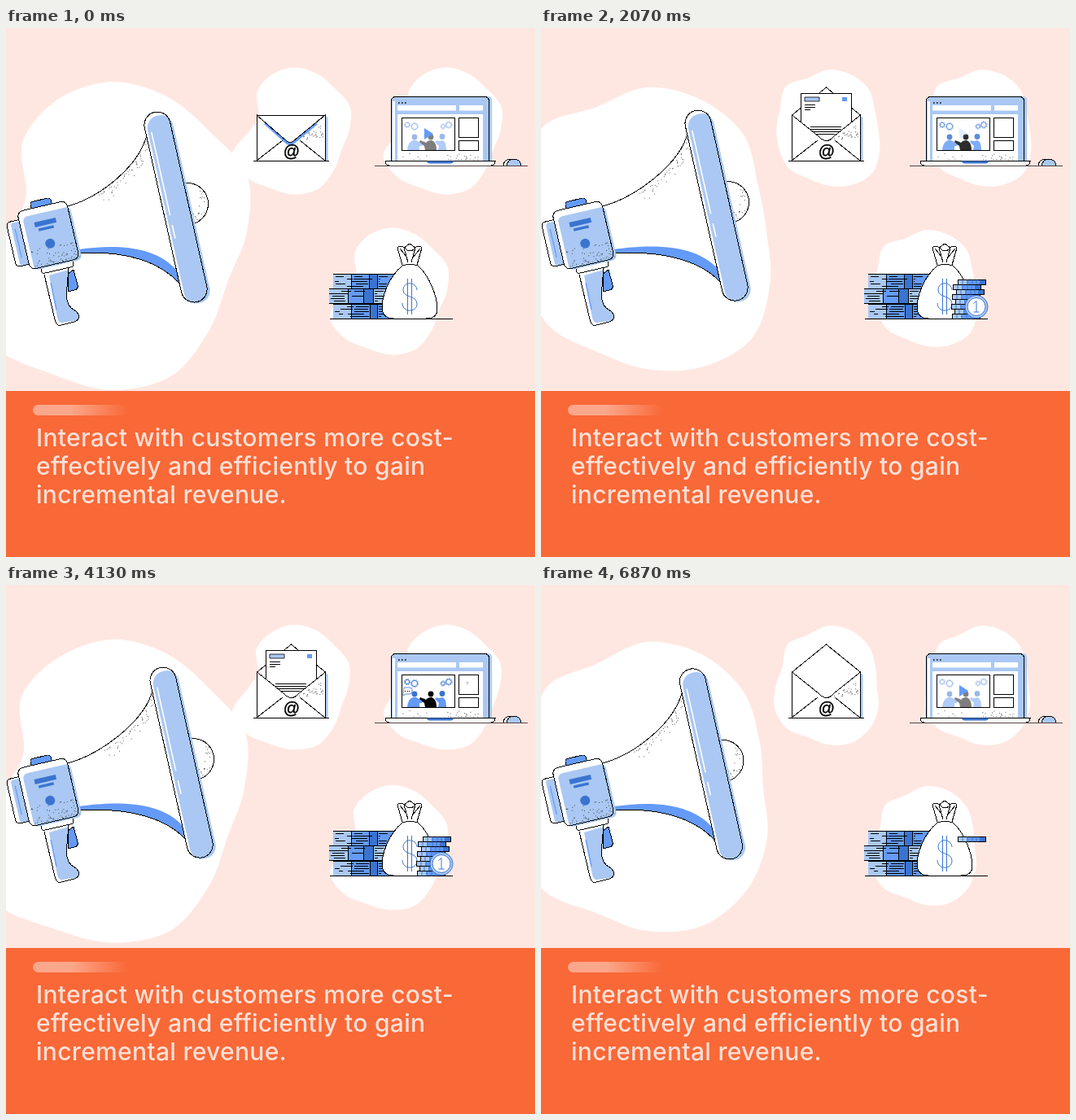
Animation of 650x650 px, one loop 6930 ms. Source, as an HTML page:

```html
<!DOCTYPE html>
<html lang="en">
<head>
<meta charset="utf-8">
<title>Customer interaction</title>
<style>
  html, body { margin: 0; width: 100%; height: 100%; overflow: hidden; background: #ffe7e1; }
  svg { display: block; width: 650px; height: 650px; }
  .ink { stroke: #000; stroke-width: 1; fill: none; shape-rendering: crispEdges; }
  .w { fill: #fff; }
  .l { fill: #aac8f3; }
  .m { fill: #649af8; }
  .d { fill: #3a74d0; }
  .dots { stroke: #333; stroke-width: .9; fill: none; }
  .thin { stroke: #3a74d0; stroke-width: 1; fill: none; }
  .copy { font: 500 30px Inter, "Open Sans", sans-serif; letter-spacing: .3px; fill: #fde0d6; }
</style>
</head>
<body>
<svg viewBox="0 0 650 650">
  <defs>
    <linearGradient id="fade">
      <stop offset=".4" stop-color="#fff" stop-opacity=".42"/>
      <stop offset="1" stop-color="#fff" stop-opacity="0"/>
    </linearGradient>
    <path id="blob" class="w"/>
  </defs>
  <rect width="650" height="650" fill="#ffe7e1"/>
  <use href="#blob"/>
  <use href="#blob" transform="translate(300.2 21.2) scale(.412)"/>
  <use href="#blob" transform="translate(486.2 21.2) scale(.412)"/>
  <use href="#blob" transform="translate(420.2 218.2) scale(.412)"/>

  <!-- megaphone -->
  <g class="mouthpiece">
    <circle class="ink w" cx="223" cy="216" r="25.5"/>
    <path class="dots" id="domeDots"/>
  </g>
  <path id="horn" class="w"/>
  <path id="hornBlue" class="m"/>
  <path id="hornEdge" class="ink"/>
  <g class="mouthpiece">
    <path class="dots" id="hornDots"/>
    <g transform="translate(186 119) rotate(-12.6)">
      <rect class="w" x="-16" y="-16" width="32" height="239" rx="16"/>
      <rect class="l" x="-13" y="-11" width="32" height="236" rx="15"/>
      <path d="M-9 7V112M-9 124V141" stroke="#fff" stroke-width="1.6"/>
      <rect class="ink" x="-16" y="-16" width="32" height="239" rx="16"/>
    </g>
  </g>
  <path class="ink m" d="M76 302L83 297L88 316Q89 321 84 322L76 324Z"/>
  <path class="w" d="M47 305L60 358Q62 367 68 365L84 361Q90 359 90 354Q88 349 83 346Q72 340 75 318L77 295Z"/>
  <path class="l" d="M53 304L63 356Q65 363 69 362L85 360Q91 358 90 354Q88 349 83 346Q72 340 75 318L77 297Z"/>
  <path class="ink" d="M47 303L60 358Q62 367 68 365L84 361Q90 359 90 354Q88 349 83 346Q72 340 75 318L77 295"/>
  <path d="M55 313L62 346" stroke="#649af8" stroke-width="1.3"/>
  <g transform="translate(52 255) rotate(-13)">
    <rect class="w" x="-47" y="-27" width="24" height="56" rx="5"/>
    <rect class="l" x="-42" y="-25" width="18" height="54" rx="4"/>
    <path d="M-38 -17V19" stroke="#649af8" stroke-width="1.2"/>
    <rect class="ink" x="-47" y="-27" width="24" height="56" rx="5"/>
    <rect class="ink m" x="-13" y="-45" width="26" height="14" rx="4"/>
    <rect class="ink w" x="-18" y="34" width="40" height="10" rx="3"/>
    <rect class="w" x="-31" y="-37" width="62" height="73" rx="7"/>
    <rect class="l" x="-26" y="-29" width="60" height="67" rx="6"/>
    <rect class="ink" x="-31" y="-37" width="62" height="73" rx="7"/>
    <path class="d" d="M-13.5 -19.5h27v6h-27zM-10 -11h19v3.3h-19z"/>
    <circle class="d" cy="10" r="6"/>
    <path class="dots" id="boxDots"/>
  </g>

  <!-- envelope -->
  <path class="l" d="M391 107L395.500 110V163H391Z"/>
  <path class="ink w" id="flapBack"/>
  <g id="letter">
    <path id="sheet" class="ink w"/>
    <g id="print">
      <path class="l" d="M324 85h18v5h-18z" stroke="#000" stroke-width=".8"/>
      <path class="m" d="M370 85h6v5h-6z"/>
      <path class="ink" d="M324 94.500h13M324 97.500h13M324 100.500h7M331 121.500h38M331 124.500h38M335 127.500h32M339 130.500h22"/>
    </g>
  </g>
  <path class="ink w" d="M308.500 107L341 133Q351 144 360 133L392.500 107V163H308.500Z"/>
  <path class="ink" d="M308 163L340 138M392 163L361 138M304 163.500H397"/>
  <path class="dots" id="envDots"/>
  <g id="flapFront">
    <path id="flapShade" fill="none" stroke="#649af8" stroke-width="3"/>
    <path id="flap" class="ink w"/>
  </g>
  <text x="351" y="158" text-anchor="middle" font-family="Liberation Sans, Arial, sans-serif" font-size="20" stroke="#000" stroke-width=".4">@</text>

  <!-- laptop -->
  <path class="l" d="M477 84H592Q597 84 597 90V163H473Z"/>
  <rect class="ink l" x="473.500" y="84.500" width="120" height="82" rx="5"/>
  <path class="w" d="M475 90h3v73h-3zM481 95h72v6.500h-72zM557 95h29v6.500h-29zM481 106h105v58h-105z"/>
  <path d="M482 92h1.600M486 92h1.600M490 92h1.600" stroke="#000" stroke-width="1.600"/>
  <path class="ink w" d="M486.500 110.500H551.500V150.500H486.500ZM556.500 110.500H580.500V134.500H556.500ZM556.500 138.500H580.500V150.500H556.500Z"/>
  <path class="dots" id="deskDots"/>
  <g id="scene">
    <g id="gears" fill="none" stroke="#3a74d0"></g>
    <path class="m" d="M493 150Q494 140 500 138L504 138Q509 142 514 139L515 141Q511 146 508 145L508 150Z"/>
    <circle class="d" cx="502" cy="134" r="3.400"/>
    <path d="M515 150L514 145L508 140L509 138L516 141Q518 138 523 138Q529 140 529 150Z"/>
    <circle cx="522" cy="134" r="3.400"/>
    <path class="m" d="M531 150L532 145L527 140L529 138Q531 140 536 138Q541 139 541 150Z"/>
    <circle class="d" cx="536" cy="133.500" r="3.400"/>
  </g>
  <g id="bubble">
    <path class="w" stroke="#3a74d0" stroke-width=".8" d="M489 126H496Q499 126 499 129V131Q499 134 496 134H491L488 136Z"/>
    <path class="ink" stroke-dasharray="1 1.500" d="M490 130H497"/>
    <text x="565" y="123" font-size="6" fill="#777" font-family="Liberation Sans, sans-serif">?</text>
  </g>
  <path id="play" class="m" d="M514 123L525 130L514 137Z"/>
  <path class="ink w" d="M466.500 163.500H601Q601 169 596 169H471Q466 169 466.500 163.500Z"/>
  <path class="d" d="M517 163.500H550Q550 166.500 546 166.500H521Q517 166.500 517 163.500Z"/>
  <g id="mouse">
    <path class="ink w" d="M611 169Q612 161 621 161Q626 161 627 169Z"/>
    <path class="ink l" d="M615 169Q617 161 623 161Q632 161 633 169Z"/>
  </g>
  <path d="M453 169.500H641" stroke="#544"/>

  <!-- money -->
  <g id="bills"></g>
  <path class="ink" d="M398 357.500H549"/>
  <path class="ink w" d="M487 291L481 270Q485 266 489 270L496 265L503 270Q507 266 511 270L505 291Z"/>
  <path class="ink" d="M484 271L493 282M509 271L500 282M489 270L494 288M503 270L498 288M490 270Q496 278 503 270"/>
  <path class="ink w" d="M487 292C470 306 462 330 462 344Q463 357 476 357H516Q530 357 530 345C530 330 520 304 506 292Q496 289 487 292Z"/>
  <path class="thin" d="M505 322C504 311 488 311 488 322C488 332 505 328 505 339C505 350 487 350 487 338M493.500 308V352M498.500 308V352"/>
  <g id="coins"></g>
  <g id="coin">
    <circle class="thin" style="fill:#aac8f3" cx="535" cy="342.500" r="14"/>
    <circle class="thin" style="fill:#fff" cx="535" cy="342.500" r="11"/>
    <path class="thin" d="M531.500 338.500L535 335.500V349M531.500 349H538.500"/>
  </g>

  <!-- caption -->
  <rect y="446" width="650" height="204" fill="#f96837"/>
  <rect x="33" y="463" width="117" height="13" rx="6.500" fill="url(#fade)"/>
  <g class="copy">
    <text x="37" y="514">Interact with customers more cost-</text>
    <text x="37" y="549">effectively and efficiently to gain</text>
    <text x="37" y="584">incremental revenue.</text>
  </g>
</svg>
<script>
const LOOP = 6930;
const $ = id => document.getElementById(id);
const put = (id, d) => $(id).setAttribute('d', d);
const show = (id, v) => $(id).setAttribute('opacity', v);
const move = (el, x, y) => el.setAttribute('transform', `translate(${x} ${y})`);
const mix = (a, b, k) => a + (b - a) * k;
const ease = (a, b, t) => {
  const k = Math.min(1, Math.max(0, (t - a) / (b - a)));
  return k * k * (3 - 2 * k);
};

let seed = 7;
const rnd = () => (seed = seed * 16807 % 2147483647) / 2147483647;

// Stipple: n small points placed by a function
function stipple(id, n, place) {
  let d = '';
  while (n--) {
    const [x, y] = place();
    d += `M${x.toFixed(1)} ${y.toFixed(1)}h.9`;
  }
  put(id, d);
}
stipple('boxDots', 65, () => [-25 + rnd() * 56, 36 - 24 * rnd() ** 1.6]);
stipple('domeDots', 20, () => {
  const a = -.9 + rnd() * 2.2, r = 14 + rnd() * 10;
  return [223 + r * Math.cos(a), 216 + r * Math.sin(a)];
});
stipple('hornDots', 48, () => {
  const t = .3 + .66 * rnd(), u = 1 - t;
  const at = (a, b, c, e) => u * u * u * a + 3 * u * u * t * b + 3 * u * t * t * c + t * t * t * e;
  return [at(76, 115, 165, 174) + 1, at(219, 208, 170, 128) + 3 + 16 * rnd() ** 2];
});
stipple('envDots', 30, () => {
  const x = 360 + rnd() * 30;
  return [x, 133 - (x - 360) * .65 + 3 + rnd() * (x - 355) * .5];
});
stipple('deskDots', 26, () => [483 + rnd() * 101, 162 - 8 * rnd() ** 1.5]);

// Banknote stacks: left edge, top, tone boundaries
function makeBills() {
  let out = '';
  for (const [x, y, a, b, c, end] of [
    [402, 302, 424, 446, 456, 476], [397, 320, 420, 439, 451, 466], [402, 339, 424, 447, 456, 472]]) {
    const part = (from, to, cls) =>
      `<rect class="${cls}" x="${from}" y="${y}" width="${to - from}" height="18.5"/>`;
    out += part(x, a, 'l') + part(a, b, 'm') + part(b, c, 'd') + part(c, end, y === 320 ? 'l' : 'm');
    let d = `M${x} ${y + .5}H${end}M${x} ${y + 18.5}H${end}M${a + .5} ${y}v18M${b + .5} ${y}v18M${c + .5} ${y}v18`;
    for (let i = 0; i < 15; i++) {
      const from = x + rnd() * (b - x - 8);
      d += `M${from} ${y + 3.5 + 3 * (i % 5)}h${4 + rnd() * 12}`;
    }
    for (let i = 0; i < 5; i++) d += `M${c + 2} ${y + 3.5 + 3 * i}h${rnd() * 14}`;
    out += `<path class="ink" d="${d}"/>`;
  }
  $('bills').innerHTML = out;
}
makeBills();

$('coins').innerHTML = [512, 506, 510, 505, 509, 504, 508, 505].map((x, i) => {
  const y = 309.5 + 6 * i;
  return `<g><rect class="m" x="${x}" y="${y}" width="34" height="6"/>
    <rect class="l" x="${x}" y="${y}" width="11" height="6"/>
    <rect class="d" x="${x + 27}" y="${y}" width="7" height="6"/>
    <path class="ink" d="M${x + .5} ${y}h34v6h-34z"/>
    <path class="thin" d="M${x + 6} ${y}v6M${x + 12} ${y}v6M${x + 18} ${y}v6M${x + 23} ${y}v6"/></g>`;
}).join('');
const coins = [...$('coins').children];

$('gears').innerHTML = [[493, 119, 2.6], [502, 121, 3.6], [537, 121, 2.2], [544, 119, 3.2]].map(([x, y, r]) =>
  `<circle cx="${x}" cy="${y}" r="${r}"/><circle cx="${x}" cy="${y}" r="${r + 1}" stroke-dasharray="1.3 1.5"/>`).join('');

// Blob outline: radii at 16 even angles, keyed by time in its own cycle
const BLOB = [
  [0, [166, 155, 170, 192, 195, 190, 202, 200, 128, 114, 155, 175, 184, 179, 172, 180]],
  [470, [159, 162, 155, 176, 182, 170, 174, 164, 130, 120, 177, 168, 179, 173, 163, 165]],
  [1370, [152, 169, 177, 170, 157, 151, 157, 146, 145, 160, 194, 160, 172, 165, 160, 152]],
  [1470, [151, 171, 184, 178, 164, 155, 161, 148, 146, 160, 199, 165, 175, 169, 161, 151]],
  [2070, [147, 164, 184, 180, 169, 160, 167, 160, 156, 158, 181, 165, 177, 175, 168, 148]],
  [2370, [143, 160, 175, 182, 175, 165, 178, 175, 158, 150, 175, 165, 180, 178, 168, 150]],
  [3270, [155, 152, 167, 182, 177, 178, 197, 195, 140, 125, 163, 170, 181, 178, 170, 172]]];
BLOB.push([4500, BLOB[0][1]]);

function keyed(keys, t) {
  let i = 1;
  while (keys[i][0] < t) i++;
  const [[t0, a], [t1, b]] = [keys[i - 1], keys[i]];
  return [a, b, (t - t0) / (t1 - t0)];
}

function drawBlob(t) {
  const [a, b, k] = keyed(BLOB, t % 4500);
  const pts = a.map((r, i) => {
    const q = mix(r, b[i], k), w = i * Math.PI / 8;
    return [130 + q * Math.cos(w), 250 + q * Math.sin(w)];
  });
  const at = i => pts[(i + 16) % 16];
  let d = `M${pts[0]}`;
  for (let i = 0; i < 16; i++) {
    const [p, s, e, n] = [at(i - 1), at(i), at(i + 1), at(i + 2)];
    d += `C${s.map((v, j) => v + (e[j] - p[j]) / 6)} ${e.map((v, j) => v - (n[j] - s[j]) / 6)} ${e}`;
  }
  put('blob', d + 'Z');
}

// Slow draw back, quick thrust, then a hold
const PULSE = [[0, 0], [200, -10], [215, -10], [350, 7], [915, 7], [960, 6], [1095, .4], [1155, 0]];

function drawMegaphone(t) {
  const [a, b, k] = keyed(PULSE, t % 1155);
  const dx = mix(a, b, k), dy = -.27 * dx;
  const p = (x, y) => `${x + dx} ${y + dy}`;
  const top = `M76 219C115 208 ${p(165, 170)} ${p(174, 128)}`;
  const low = `C${p(190, 287)} 147 273 90 277`;
  put('horn', `${top}L${p(215, 316)}${low}Z`);
  put('hornBlue', `M90 272C125 267 ${p(182, 264)} ${p(211, 299)}L${p(215, 316)}${low}Z`);
  put('hornEdge', `${top}M${p(215, 316)}${low}`);
  document.querySelectorAll('.mouthpiece').forEach(g => move(g, dx, dy));
}

function drawEnvelope(t) {
  t %= 3300;
  const open = ease(100, 260, t) - ease(3050, 3210, t);
  const drop = 60 * (1 - ease(320, 680, t) + ease(2560, 2920, t));
  const tip = mix(142, 73, open);
  const back = tip < 107;
  put('flapBack', `M308.500 107L350.500 ${back ? tip : 107}L392.500 107L360 133Q351 144 341 133Z`);
  put('sheet', `M319.500 ${80.5 + drop}H381.500V162H319.500Z`);
  show('letter', drop < 59 ? 1 : 0);
  move($('print'), 0, drop);
  show('flapFront', back ? 0 : 1);
  put('flap', `M308 107L345 ${tip - 3}Q349 ${tip} 353 ${tip - 3}L392 107Z`);
  put('flapShade', `M318 117L345 ${tip - 1}Q349 ${tip + 2} 353 ${tip - 1}L382 117`);
}

function drawLaptop(t) {
  t %= 5650;
  const on = ease(1300, 2600, t) - ease(4850, 5450, t);
  show('scene', .5 + .5 * on);
  show('play', Math.max(0, 1 - 1.1 * on) * (t > 1300 && t < 5450 ? .6 : 1));
  show('bubble', ease(2800, 3100, t) - ease(4300, 4600, t));
  move($('mouse'), -1.5 * (ease(380, 450, t) - ease(480, 560, t)), 0);
  document.querySelectorAll('#gears circle:nth-child(even)').forEach(c =>
    c.setAttribute('stroke-dashoffset', t / 300));
}

function drawMoney(t) {
  t %= LOOP / 2;
  const q = Math.min(t, LOOP / 2 - t);
  coins.forEach((c, i) => c.setAttribute('opacity', i < Math.round(q / 48) ? 1 : 0));
  show('coin', ease(420, 560, q));
}

function frame(now) {
  const t = now % LOOP;
  drawBlob(t);
  drawMegaphone(t);
  drawEnvelope(t);
  drawLaptop(t);
  drawMoney(t);
}

const start = performance.now();
(function tick() {
  frame(performance.now() - start);
  requestAnimationFrame(tick);
})();
</script>
</body>
</html>
```
